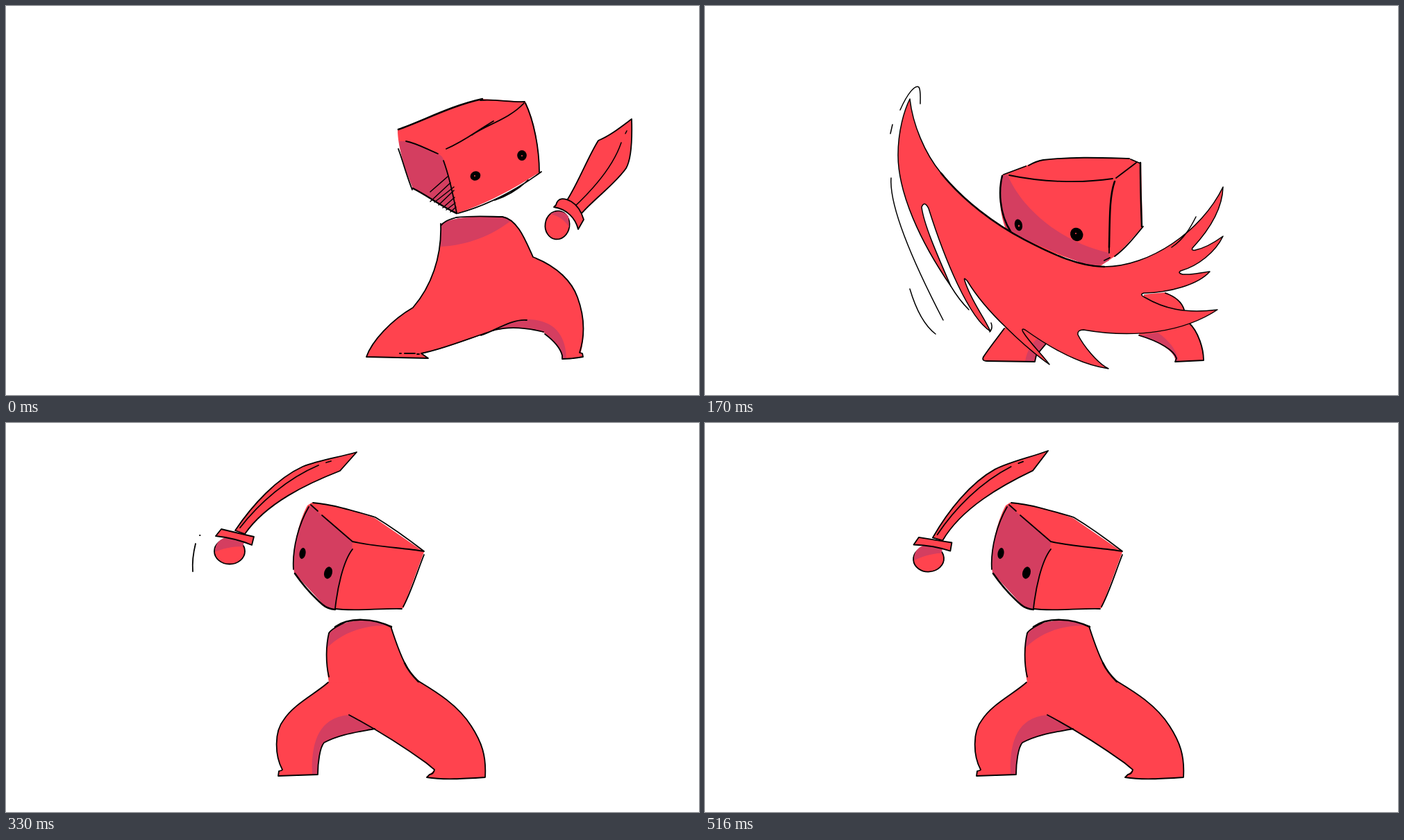
Recreate the animation shown at these times as an HTML page. Size 998 by 561 pixels, loop 580 ms.

```html
<!DOCTYPE html>
<html lang="en">
<head>
<meta charset="utf-8">
<title>Sword swing</title>
<style>
html, body { margin: 0; width: 100%; height: 100%; overflow: hidden; background: #fff; }
svg { display: block; width: 100%; height: 100%; }
path, ellipse { fill: #ff434e; }
.s { fill: #d43e60; }
.l { fill: none; stroke: #000; stroke-width: 1.8; stroke-linecap: round; stroke-linejoin: round; }
.o { stroke: #000; stroke-width: 1.8; stroke-linejoin: round; }
.b { stroke-width: 2.5; }
.t { stroke-width: 1.5; }
.k { fill: #000; }
.pose { display: none; }
.pose.on { display: inline; }
</style>
</head>
<body>
<svg viewBox="0 0 998 561">
<defs>
  <!-- wind-up stance -->
  <g id="headA">
    <path d="M564,179 C600,166 640,144 686,134 L748,138 C760,162 768,200 768,240 C740,258 700,282 650,299 L586,263 C577,240 564,205 564,179Z"/>
    <path class="s" d="M566,195 L576,195 C592,198 607,207 622,213 Q631,217 633,230 C641,250 644,275 649,298 L586,263 C576,240 568,215 566,195Z"/>
    <path class="l b" d="M565,178 C600,166 640,144 686,134 M586,263 C608,274 625,288 649,299"/>
    <path class="l" d="M683,136 C705,134 725,139 747,138 M748,140 C760,165 768,205 768,240 M771,239 C745,258 705,284 651,299 M704,280 C722,274 738,264 752,251 M634,206 C660,195 675,182 702,166 M671,186 C690,172 725,163 746,140 M565,206 C572,225 576,242 585,265 M576,195 C592,198 607,207 622,213 M630,223 C640,250 644,275 649,298"/>
    <path class="l t" d="M611,268 L636,246 M611,282 L640,255 M617,283 L645,261 M623,287 L645,266 M629,291 L646,276 M634,294 L647,284 M640,297 L648,290"/>
    <ellipse class="k" cx="676" cy="245" rx="7.5" ry="6.7" transform="rotate(-25 676 245)"/>
    <ellipse class="k" cx="743" cy="215.500" rx="6.800" ry="7.500"/>
    <ellipse cx="675" cy="245" rx="1" ry="1"/><ellipse cx="743" cy="216" rx="1" ry="1"/>
  </g>
  <g id="bodyA">
    <path d="M626,315 C640,304 690,302 718,304 C737,310 748,338 759,362 C795,376 815,398 823,420 C834,450 834,475 828,499 L831,506 L801,509 C799,490 788,482 775,471 C750,463 725,462 700,469 C670,479 630,495 598,501 L608,508 L519,506 C527,483 555,453 586,435 C612,405 628,362 626,315Z"/>
    <path class="s" d="M626,315 C640,304 690,302 718,304 L728,309 C700,331 665,345 626,347Z"/>
    <path class="s" d="M700,469 C715,460 735,452 750,452 C790,452 806,475 807,508 L801,509 C799,490 788,482 775,471 C750,463 720,462 700,469Z"/>
    <path class="l" d="M626,317 C632,309 640,308 648,305 C675,302 700,304 715,304 C737,308 748,338 759,362 C795,376 815,398 823,420 C834,450 834,475 826,500 L830,501 L831,506 C820,508 810,509 801,509 V504 C798,492 788,482 776,473 M774,470 C750,464 725,462 705,467 C670,478 630,495 598,501 L608,508 L519,506 C527,483 555,453 586,435 C612,405 628,362 626,314 M684,475 C705,468 728,451 750,453 M567,501 h2 M574,501 h15 M592,502 h3"/>
  </g>
  <g id="swordA">
    <ellipse class="o" cx="794" cy="316" rx="17.500" ry="20.500" transform="rotate(8 794 316)"/>
    <path class="s" d="M784,300 C793,294 806,296 810,304 L811,320 C806,309 796,303 784,300Z"/>
    <path class="o" d="M808,280 C825,253 838,218 853,194 C870,187 885,175 901,163 C902,195 900,222 893,234 C877,257 845,280 829,299Z"/>
    <path class="l t" d="M817,291 C848,262 875,230 886,197 M892,184 L894,180"/>
    <path class="o" d="M792,287 C795,275 805,277 814,282 C824,288 829,298 832,308 L824,322 C820,306 808,293 789,290Z"/>
  </g>

  <!-- follow-through stance -->
  <g id="headB">
    <path d="M440,115 C470,116 505,128 531,137 L602,186 L572,267 C540,269 500,271 462,267 L415,216 C412,185 420,145 434,119Z"/>
    <path class="s" d="M438,118 L499,172 L498,183 C485,200 477,240 474,268 L460,265 L415,216 C412,180 421,145 438,118Z"/>
    <path class="l" d="M442,115 C470,117 505,128 532,136 C555,150 580,168 602,185 M602,190 C592,215 583,245 572,265 M570,268 C540,267 500,272 474,268 M439,118 L449,127 M455,133 L499,171 C530,178 570,180 602,185 M499,182 C485,200 477,240 474,268 M414,211 C412,180 422,145 436,121"/>
    <path class="l b" d="M474,269 Q463,268 456,262 C440,248 425,230 416,217"/>
    <ellipse class="k" cx="427" cy="188" rx="4.500" ry="8" transform="rotate(10 427 188)"/>
    <ellipse class="k" cx="464" cy="216" rx="5.800" ry="8.800" transform="rotate(15 464 216)"/>
  </g>
  <g id="legs">
    <path d="M465,373 C445,391 415,405 400,428 C386,445 387,480 398,500 L392,502 V509 L449,507 C449,490 452,468 458,461 C480,449 505,446 531,441 C565,461 590,480 617,500 L606,511 C630,515 660,513 690,511 C692,480 685,460 670,437 C650,405 615,385 591,370Z"/>
    <path class="s" d="M441,507 C440,470 445,425 494,421 L531,441 C505,446 480,449 458,461 C452,468 449,490 449,507Z"/>
    <path class="l" d="M464,374 C445,391 415,405 400,428 C386,445 387,480 398,500 M397,501 L393,502 L392,509 L449,507 C449,490 452,468 458,461 C480,449 505,446 531,441 M494,421 C530,440 570,465 605,490 L617,500 Q616,506 610,507 L606,511 C630,515 660,513 690,511 C692,480 685,460 670,437 C650,405 615,385 592,371"/>
  </g>
  <g id="bodyB">
    <use href="#legs"/>
    <path d="M465,375 C460,345 461,320 465,302 C485,283 520,279 554,293 C562,318 570,345 593,373Z"/>
    <path class="s" d="M465,302 C485,283 520,279 554,293 C525,289 485,300 462,325Z"/>
    <path class="l" d="M465,366 C460,345 461,320 465,303 C468,297 480,292 487,288 M554,293 C562,318 570,340 578,353"/>
    <path class="l b" d="M474,294 C495,279 530,282 555,294 M574,346 Q580,359 594,373"/>
  </g>
  <g id="swordB">
    <ellipse class="o" cx="322" cy="185" rx="22" ry="18.500"/>
    <path class="s" d="M301,186 C301,172 310,166 318,165 L343,172 L341,178 C325,178 312,181 301,186Z"/>
    <path class="o" d="M330,155 C355,118 390,80 427,63 C452,53 478,50 505,42 L481,69 C435,87 375,115 344,160Z"/>
    <path class="l" d="M337,151 C365,115 405,80 450,61 M461,57 L468,55"/>
    <path class="o" d="M310,153 Q335,159 357,164 L354,176 C340,170 320,165 302,163Z"/>
  </g>
</defs>

<g class="pose">
  <use href="#bodyA"/><use href="#headA"/><use href="#swordA"/>
</g>

<g class="pose">
  <use href="#bodyA" x="-3.500"/><use href="#headA" x="-3" y="-3"/>
  <use href="#swordA" transform="translate(791 295) rotate(-6.1) scale(.93) translate(-794 -316)"/>
</g>

<g class="pose">
  <path d="M433,463 L401,506 Q398,512 406,512 H475 L477,504 L492,486 L470,450Z"/>
  <path class="s" d="M461,512 C464,497 470,487 480,478 L492,486 L477,504 L475,512Z"/>
  <path d="M632,416 L663,413 C680,420 688,430 690,440 L697,457 C711,470 718,495 718,511 L677,513 C680,500 655,484 625,475Z"/>
  <path class="s" d="M625,475 L652,471 C668,482 680,497 682,512 H678 C678,500 655,482 625,475Z"/>
  <path class="l" d="M431,465 C420,480 408,495 401,506 Q398,512 406,512 L475,513 L477,504 L492,486 M663,414 C680,420 687,428 690,438 M697,457 C711,470 718,495 718,511 L677,513 L679,508 C676,497 655,484 625,475"/>
  <path d="M428,244 C450,236 465,228 487,222 C530,217 575,219 611,220 L628,227 L630,319 C617,333 603,350 590,361 L565,378 L440,335 C424,310 422,275 428,244Z"/>
  <path class="s" d="M428,243 L436,244 C455,290 510,340 582,356 L582,367 L560,378 L437,327 C423,300 423,265 428,243Z"/>
  <path class="l" d="M430,243 L462,231 M466,230 Q476,224 487,222 C530,217 575,219 611,220 M613,221 L627,227 M621,226 L592,248 M438,244 C485,254 540,256 587,249 M582,348 v8 M575,367 L583,363 M631,318 C618,334 605,350 590,361"/>
  <path class="l b" d="M627,226 C627,255 628,290 629,318 M590,253 C582,275 583,310 582,348 M428,245 C423,265 423,298 440,325"/>
  <ellipse class="k" cx="451.500" cy="316" rx="5.500" ry="8.500" transform="rotate(-12 451 316)"/>
  <ellipse class="k" cx="535" cy="329.500" rx="9" ry="10" transform="rotate(-30 535 329)"/>
  <ellipse cx="452" cy="317" rx="1" ry="1.500"/><ellipse cx="534" cy="328" rx="1" ry="1"/>
  <path class="o t" d="M295,134 C299,170 316,212 340,241 C372,281 418,315 460,337 C500,358 540,376 575,376 C640,376 715,325 746,261
    C745,300 715,335 702,349 Q700,353 706,352 C720,349 735,340 746,332 C735,355 710,375 685,382 Q680,385 688,387 C705,388 715,384 727,383
    C710,402 670,413 632,414 Q625,416 633,420 C660,436 690,444 738,438 C690,470 620,480 545,467 Q536,467 537,474 C545,490 565,515 581,523
    C540,517 500,495 461,467 Q455,464 458,470 C468,486 485,502 496,517 C472,500 450,480 433,463 C410,441 392,420 378,397 Q372,390 374,396 C383,425 400,445 411,469
    C380,450 345,365 322,292 Q316,280 312,290 C315,315 335,360 354,404 C310,340 278,270 278,215 C278,180 287,150 295,134Z"/>
  <path class="l b" d="M340,241 C372,281 418,315 460,337 C500,358 540,376 575,376"/>
  <path class="l t" d="M354,404 Q366,424 380,438 M412,457 Q415,465 410,470 M281,150 C292,125 303,113 308,117 C311,122 310,132 310,141 M270,171 L267,184 M268,248 C265,290 300,370 343,453 M295,408 C303,435 315,460 332,473 M672,348 C690,336 700,318 707,304"/>
</g>

<g class="pose">
  <use href="#legs" transform="matrix(1.007 -.01 0 1 -2.7 5)"/>
  <path d="M463,375 C456,350 454,330 457,309 C475,288 510,280 548,296 C555,318 570,350 592,372Z"/>
  <path class="s" d="M457,309 C475,288 510,280 548,296 C515,292 475,303 456,333Z"/>
  <path class="l" d="M463,373 C456,350 454,330 457,309 Q468,297 480,292 M547,296 C555,315 565,337 574,350"/>
  <path class="l b" d="M457,309 C478,286 515,284 548,295 M570,346 Q580,361 593,370"/>
  <use href="#headB" transform="matrix(1 -.043 .025 .99 -6.9 24.1)"/>
  <ellipse class="o" cx="338.500" cy="279" rx="22.500" ry="18.500"/>
  <path class="s" d="M317,281 C317,266 330,260 342,261 L357,266 C345,267 330,272 317,281Z"/>
  <path d="M320,240 C313,205 320,165 332,133 C338,118 345,108 355,101 L332,109 L347,99 L334,102 L357,82 C340,86 315,105 299,121 C303,97 335,70 366,62 C390,53 420,53 441,63 C428,75 420,85 417,98 C403,100 381,126 368,155 C356,185 350,215 347,243Z"/>
  <path class="s" d="M330,160 C333,185 337,205 342,225 L347,243 L321,240 C316,215 316,195 321,170Z"/>
  <path class="l" d="M320,238 C313,205 320,165 332,133 C338,118 345,108 353,102 M331,110 L351,101 M334,102 L357,82 C340,86 315,105 299,121 C303,97 335,70 366,62 C390,53 420,53 441,63 C428,75 420,85 417,98 C403,100 381,126 368,155 C356,185 350,215 347,242"/>
  <path class="l t" d="M413,66 C375,90 355,115 346,154 M342,172 L339,187 M291,280 C305,315 325,360 363,397 M345,360 C355,375 370,385 390,399"/>
  <path class="o" d="M307,241 Q303,250 306,262 C325,258 345,260 368,265 L367,251 C345,243 325,241 307,241Z"/>
</g>

<g class="pose">
  <use href="#bodyB"/><use href="#headB"/><use href="#swordB"/>
  <path class="l" d="M279,162 h.5 M273,174 C269,190 268,200 269,214"/>
</g>

<g class="pose">
  <use href="#bodyB" x="-1"/><use href="#headB" x="-1"/>
  <use href="#swordB" transform="translate(0 11) rotate(-4.2 322 184)"/>
</g>
</svg>
<script>
const poses = document.querySelectorAll('.pose');
const ends = [80, 170, 250, 330, 420, 580];
const start = performance.now();

function draw() {
  const t = (performance.now() - start) % 580;
  const now = ends.findIndex(end => t < end);
  poses.forEach((pose, i) => pose.classList.toggle('on', i === now));
  requestAnimationFrame(draw);
}
draw();
</script>
</body>
</html>
```
